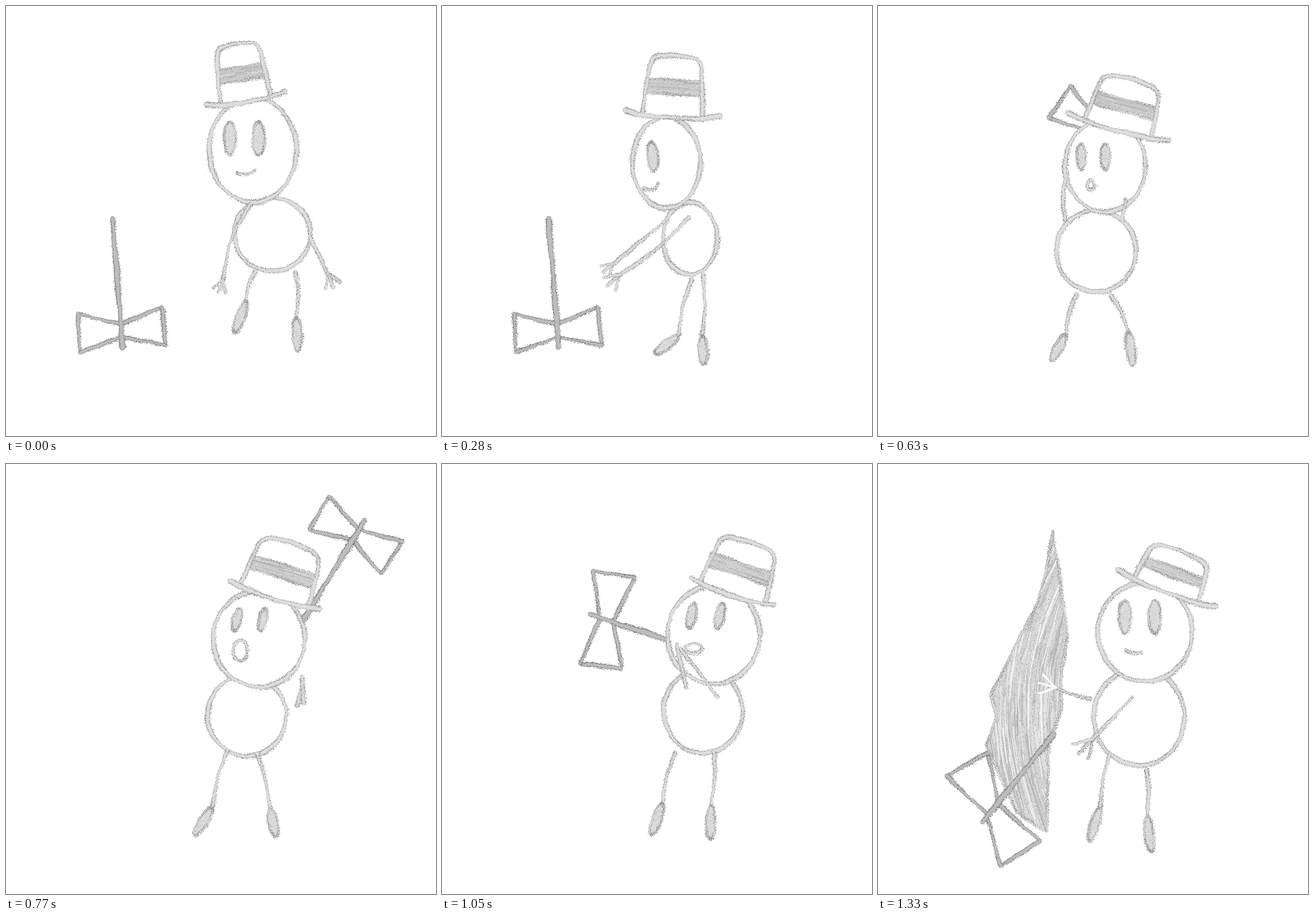
Animation of 748x748 px, one loop 1.47 s. Source, as an HTML page with a canvas:

```html
<!DOCTYPE html>
<html lang="en">
<head>
<meta charset="utf-8">
<title>Pencil woodcutter</title>
<style>
html, body { margin: 0; width: 100%; height: 100%; overflow: hidden; background: #fff; }
canvas { display: block; width: 100vw; height: 100vh; }
</style>
</head>
<body>
<canvas id="stage" width="748" height="748"></canvas>
<script>
const SIZE = 748, LOOP = 1470, BEAT = 140;

// core and light: body of a line; tone: darkest grain; grain: dots per pixel; patch: unevenness
const BODY = { core: '#cecece', light: '#dedede', tone: 134, grain: 2.5, patch: 0.6, inner: 210, width: 1 };
const IRON = { core: '#acacac', light: '#bdbdbd', tone: 106, grain: 2.4, patch: 0.5, inner: 176, width: 1 };
const DARK = { core: '#8c8c8c', light: '#888', tone: 122, grain: 1.8, patch: 0.7, inner: 132, width: 0.7 };
const FAINT = { tone: 122, grain: 1.3, patch: 1.5, inner: 150, width: 0.4 };
const SMUDGE = { tone: 108, grain: 2.6, patch: 0.9, inner: 130, width: 0.5 };
const CHALK = { core: '#f2f2f2', light: '#fff', tone: 205, grain: 0.6, patch: 0, inner: 245, width: 1 };

let ctx, ink = BODY, seed = 1;

const rnd = () => {
  seed = (seed * 1664525 + 1013904223) >>> 0;
  return seed / 4294967296;
};
const spread = () => rnd() + rnd() - 1;
const grey = v => { v = Math.round(v); return `rgb(${v},${v},${v})`; };

function dot(x, y, v) {
  ctx.fillStyle = grey(v);
  ctx.fillRect(Math.round(x), Math.round(y), 1, 1);
}

// Maps local points to the stage
const frame = (x, y, rot) => ([u, v]) =>
  [x + u * Math.cos(rot) - v * Math.sin(rot), y + u * Math.sin(rot) + v * Math.cos(rot)];

// Points about 1px apart, along straight segments or a Catmull-Rom curve
function sample(pts, curved) {
  const out = [], at = i => pts[Math.max(0, Math.min(pts.length - 1, i))];
  for (let i = 0; i < pts.length - 1; i++) {
    const [a, b, c, d] = [at(i - 1), at(i), at(i + 1), at(i + 2)];
    const n = Math.max(2, Math.ceil(Math.hypot(c[0] - b[0], c[1] - b[1])));
    for (let k = 0; k < n; k++) {
      const t = k / n;
      out.push([0, 1].map(j => curved
        ? b[j] + t * (c[j] - a[j] + t * (2 * a[j] - 5 * b[j] + 4 * c[j] - d[j] + t * (3 * (b[j] - c[j]) + d[j] - a[j]))) / 2
        : b[j] + t * (c[j] - b[j])));
    }
  }
  out.push(at(pts.length - 1));
  return out;
}

function fill(pts, color) {
  ctx.beginPath();
  pts.forEach(([x, y]) => ctx.lineTo(x, y));
  ctx.fillStyle = color;
  ctx.fill();
}

function pencil(w, line) {
  const p = rnd() * 9, q = rnd() * 9;
  const wob = i => Math.sin(i * 0.07 + p) * 0.7 + Math.sin(i * 0.19 + q) * 0.5;
  const half = i => w * ink.width * (0.43 + 0.09 * Math.sin(i * 0.045 + q));
  line = line.map(([x, y], i) => [x + wob(i) * 0.7, y + wob(i + 40) * 0.7]);
  for (const [color, k] of ink.core ? [[ink.core, 0.95], [ink.light, 0.6]] : []) {
    ctx.fillStyle = color;
    line.forEach(([x, y], i) => {
      ctx.beginPath();
      ctx.arc(x, y, half(i) * k, 0, 7);
      ctx.fill();
    });
  }
  line.forEach(([x, y], i) => {
    const [ax, ay] = line[Math.max(0, i - 1)], [bx, by] = line[Math.min(line.length - 1, i + 1)];
    const len = Math.hypot(bx - ax, by - ay) || 1, nx = (ay - by) / len, ny = (bx - ax) / len;
    const lump = Math.sin(i * 0.05 + p), rough = 1.5 + Math.max(0, lump);
    for (let g = ink.grain * (1 + ink.patch * lump); rnd() < g; g--) {
      const off = (rnd() < 0.5 ? -1 : 1) * half(i) + spread() * rough;
      dot(x + nx * off + spread(), y + ny * off + spread(), ink.tone + rnd() * 48);
    }
  });
}

const line = (w, ...pts) => pencil(w, sample(pts, false));
const curve = (w, ...pts) => pencil(w, sample(pts, true));

// Curve between two points whose middle is pushed sideways
function bow(w, [x1, y1], [x2, y2], bend) {
  const len = Math.hypot(x2 - x1, y2 - y1) || 1;
  curve(w, [x1, y1], [(x1 + x2) / 2 - (y2 - y1) / len * bend, (y1 + y2) / 2 + (x2 - x1) / len * bend], [x2, y2]);
}

function ellipse(cx, cy, rx, ry, rot = 0) {
  const n = Math.ceil(6 * Math.max(rx, ry));
  return Array.from({ length: n + 1 }, (_, i) => {
    const a = i / n * 2 * Math.PI;
    return [rx * Math.cos(a), ry * Math.sin(a)];
  }).map(frame(cx, cy, rot));
}

function oval(cx, cy, rx, ry, rot = 0) {
  if (ink.core) fill(ellipse(cx, cy, rx - 1, ry - 1, rot), ink.light);
  const put = frame(cx, cy, rot);
  for (let i = 0; i < rx * ry * (ink.core ? 0.9 : 0.25); i++)
    dot(...put([spread() * rx, spread() * ry]), ink.inner + spread() * 24);
  pencil(ink.core ? 3 : 7, ellipse(cx, cy, rx - 1, ry - 1, rot));
}

const foot = ([x1, y1], [x2, y2], w) =>
  oval((x1 + x2) / 2, (y1 + y2) / 2, w, Math.hypot(x2 - x1, y2 - y1) / 2, Math.atan2(y2 - y1, x2 - x1) - Math.PI / 2);

const fan = (x, y, dir, len) => [-0.55, 0, 0.55].forEach(a =>
  line(5, [x, y], [x + len * Math.cos(dir + a), y + len * Math.sin(dir + a)]));

// Polygon of pencil streaks; bias crowds them to the top, lean(y) slants them
function shade(pts, { base, lo, hi, count, length, lean, bias = 1, grain = 0.1 }) {
  const xs = pts.map(p => p[0]), ys = pts.map(p => p[1]);
  const x0 = Math.min(...xs), y0 = Math.min(...ys);
  const w = Math.max(...xs) - x0, h = Math.max(...ys) - y0;
  ctx.save();
  fill(pts, base || 'transparent');
  ctx.clip();
  for (let i = 0; i < count; i++) {
    const x = x0 + rnd() * w, y = y0 + rnd() ** bias * h, k = length * (0.3 + rnd() * 0.4), a = lean(y);
    ctx.beginPath();
    ctx.moveTo(x - k * Math.cos(a), y - k * Math.sin(a));
    ctx.quadraticCurveTo(x + spread() * 3, y, x + k * Math.cos(a), y + k * Math.sin(a));
    ctx.strokeStyle = grey(lo + rnd() * (hi - lo));
    ctx.lineWidth = 0.5 + rnd() * 1.7;
    ctx.stroke();
  }
  for (let i = 0; i < w * h * grain; i++)
    dot(x0 + rnd() * w, y0 + rnd() ** bias * h, lo + spread() * 20);
  ctx.restore();
}

function hat([x, y, tilt, brim, crown, height], hard) {
  const put = frame(x, y, tilt), at = (u, v) => put([u * crown, -v * height]);
  const top = [at(-1, 0), at(-0.92, 0.5), at(-0.78, 0.93), at(-0.3, 1.03), at(0.4, 1.02), at(0.83, 0.92), at(0.95, 0.5), at(1, 0)];
  if (ink.core) fill(top, '#fff');
  const band = [at(-0.95, 0.62), at(0.93, 0.62), at(0.95, 0.37), at(-0.95, 0.37)];
  shade(band, ink.core
    ? { base: '#d0d0d0', lo: 172, hi: 226, count: 60, length: 45, lean: () => tilt }
    : { lo: 125, hi: 165, count: 26, length: 28, lean: () => tilt, grain: 0.18 });
  pencil(3, sample([...band, band[0]], false));
  pencil(8, sample(top, true));
  ink = hard;
  curve(9, put([-brim, -6]), put([-brim / 2, 1]), put([brim / 2, 1]), put([brim, -6]));
}

// Handle from the grip down its own axis, two mirrored blades near the end
function axe([x, y, rot, len, size, twist], wood = IRON, blade = IRON) {
  const put = frame(x, y, rot), head = put([0, len - 30]);
  const at = frame(...head, rot + twist);
  ink = blade;
  for (const s of [-size, size]) {
    line(7, at([0, -11 * size]), at([s * 73, -35 * size]));
    line(7, at([s * 73, -35 * size]), at([s * 75, 32 * size]));
    line(7, at([s * 75, 32 * size]), at([0, 11 * size]));
  }
  ink = wood;
  line(10, [x, y], put([0, len]));
}

function man({ body, head, hat: cap, eyes, mouth, arms, legs, axe: tool }, soft = BODY, hard = soft) {
  ink = soft;
  pencil(8, ellipse(...body));
  legs.forEach(([hx, hy, ax, ay, tx, ty], i) => {
    bow(6.5, [hx, hy], [ax, ay], i ? -4 : 4);
    foot([ax, ay], [tx, ty], 9);
  });
  if (ink.core) fill(ellipse(...head), '#fff');
  pencil(8, ellipse(...head));
  const [ex, ey, gap, ry, tilt] = eyes;
  for (const s of gap ? [-1, 1] : [0]) oval(ex + s * gap, ey, ry * 0.38, ry, tilt);
  const [mx, my, half, bend, slant, open] = mouth, lip = frame(mx, my, slant);
  if (open > 5) pencil(5, ellipse(mx, my, half, open));
  else curve(5, lip([-half, -bend]), lip([0, bend]), lip([half, -bend]));
  hat(cap, hard);
  arms.forEach(([sx, sy, hx, hy, bend, finger], i) => {
    ink = i ? hard : soft;
    bow(6, [sx, sy], [hx, hy], bend);
    if (finger > 0) fan(hx, hy, Math.atan2(hy - sy, hx - sx), finger);
    if (finger < 0) pencil(5, ellipse(hx, hy, -finger / 3, -finger, tool[2]));
  });
}

// hat: x y tilt brim crown height; eyes: x y gap size tilt; mouth: x y half bend slant open
// arms: shoulder, hand, bend, fingers; legs: hip, ankle, toe; axe: grip, angle, length, size, twist
const stand = {
  hat: [417, 165, -0.17, 71, 44, 98], head: [429, 250, 76, 91], body: [463, 397, 66, 64],
  eyes: [414, 230, 25, 30, 0], mouth: [418, 290, 18, 2, -0.2, 0],
  arms: [[425, 343, 377, 476, 10, 24], [528, 400, 559, 466, 0, 27]],
  legs: [[433, 462, 418, 512, 397, 569], [503, 462, 505, 540, 507, 601]],
  axe: [185, 370, -0.08, 225, 1, 0]
};
const bend = {
  hat: [400, 192, 0.06, 83, 52, 103], head: [390, 272, 59, 79], body: [431, 404, 47, 63],
  eyes: [366, 261, 0, 27, -0.1], mouth: [364, 316, 15, 4, -0.35, 0],
  arms: [[390, 372, 298, 448, 0, 23], [430, 367, 310, 467, -6, 30]],
  legs: [[434, 475, 411, 573, 369, 605], [454, 466, 452, 572, 455, 624]],
  axe: stand.axe
};
const hold = {
  hat: [411, 200, 0.19, 93, 52, 112], head: [402, 272, 80, 79], body: [395, 404, 45, 53],
  eyes: [400, 250, 26, 25, 0.06], mouth: [397, 295, 30, 0, 0.08, 0],
  arms: [[350, 372, 283, 424, 0, -22], [348, 385, 270, 458, 0, -22]],
  legs: [[371, 462, 361, 558, 348, 608], [415, 460, 439, 540, 436, 603]],
  axe: [297, 407, 0.55, 202, 0.95, 0]
};
const lift = {
  hat: [417, 215, 0.26, 92, 60, 88], head: [395, 278, 70, 80], body: [379, 426, 69, 71],
  eyes: [374, 262, 21, 24, 0], mouth: [370, 311, 6, 0, 0, 9],
  arms: [[325, 375, 326, 300, -4, 0], [425, 375, 430, 335, 0, 0]],
  legs: [[345, 500, 327, 570, 300, 618], [404, 503, 435, 565, 443, 627]],
  axe: [365, 225, -2.52, 50, 1, 0]
};
const shout = {
  hat: [487, 223, 0.32, 78, 64, 101], head: [459, 298, 84, 85], body: [436, 425, 68, 70],
  eyes: [445, 257, 23, 21, 0.35], mouth: [423, 313, 15, 0, 0, 22],
  arms: [[505, 410, 515, 355, 3, 0], [517, 405, 515, 360, 0, 0]],
  legs: [[402, 480, 372, 590, 339, 641], [450, 488, 469, 596, 481, 641]],
  axe: [412, 205, 2.65, 115, 1, -0.44]
};
const strike = {
  hat: [505, 229, 0.32, 76, 56, 88], head: [471, 296, 78, 85], body: [456, 432, 69, 76],
  eyes: [457, 268, 26, 25, 0.1], mouth: [437, 325, 13, 2, 0.4, 0],
  arms: [[474, 406, 390, 392, 0, 0], [402, 368, 345, 402, 8, 0]],
  legs: [[398, 515, 381, 588, 370, 648], [477, 508, 457, 590, 447, 662]],
  axe: [402, 381, 1.38, 184, 1.15, 0]
};
const rest = {
  hat: [500, 221, 0.36, 92, 60, 72], head: [464, 292, 82, 86], body: [454, 440, 79, 84],
  eyes: [455, 266, 26, 30, 0], mouth: [444, 327, 15, 2, 0.1, 0],
  arms: [[370, 409, 310, 388, -3, 0], [443, 405, 373, 478, 0, 37]],
  legs: [[403, 505, 386, 597, 367, 657], [466, 530, 468, 611, 475, 676]],
  axe: [305, 470, 0.68, 198, 1.22, 0.35]
};

function mix(a, b, t) {
  if (typeof a === 'number') return a + (b - a) * t;
  if (Array.isArray(a)) return a.map((v, i) => mix(v, b[i], t));
  return Object.fromEntries(Object.keys(a).map(k => [k, mix(a[k], b[k], t)]));
}

function scene(pose, dx = 0, dy = 0) {
  axe(pose.axe);
  ctx.translate(dx, dy);
  man(pose);
}

function impact() {
  const flash = [[305, 126], [314, 210], [323, 318], [300, 390], [296, 512], [262, 420], [247, 318], [258, 270], [290, 215]];
  shade(flash, { lo: 132, hi: 160, count: 270, length: 75, lean: () => 1.78, bias: 1.5, grain: 0.08 });
  axe(strike.axe, DARK, SMUDGE);
  man(strike, FAINT, DARK);
  for (const [x, y] of [[254, 411], [270, 328], [452, 206], [476, 158], [572, 195], [512, 373]]) oval(x, y, 4, 5);
  ink = SMUDGE;
  bow(7, [207, 528], [290, 520], 12);
}

function felled() {
  const trunk = [[304, 116], [315, 190], [330, 303], [318, 360], [320, 420], [297, 490], [293, 640],
    [240, 605], [188, 490], [205, 440], [196, 400], [278, 240], [293, 180]];
  const lean = y => Math.PI / 2 + (430 - y) / 500;
  shade(trunk, { base: '#d8d8d8', lo: 172, hi: 238, count: 420, length: 90, lean, grain: 0.13 });
  shade(trunk, { lo: 232, hi: 250, count: 110, length: 80, lean, grain: 0 });
  ink = BODY;
  pencil(4, sample([...trunk, trunk[0]], false));
  scene(rest);
  ink = CHALK;
  fan(310, 389, -2.9, 32);
}

const cuts = [
  () => scene(stand),
  () => scene(mix(stand, bend, 0.08), 0, -6),
  () => scene(bend),
  () => scene(hold),
  () => scene({ ...mix(hold, lift, 0.72), axe: [300, 365, 1.15, 202, 0.95, 0] }),
  () => scene(lift),
  () => scene({ ...mix(lift, shout, 0.7), arms: shout.arms, axe: [506, 289, -2.59, 225, 1, 0] }, 0, 12),
  () => { foot([310, 141], [308, 194], 6); scene(shout); },
  () => scene({ ...mix(shout, strike, 0.6), arms: [[474, 406, 408, 320, 0, 0], [418, 390, 402, 312, 0, 0]] }, 6),
  impact,
  felled
];
// The held axe stays for half a beat only
const startOf = i => BEAT * i - (i > 3 ? BEAT / 2 : 0);

const sheets = cuts.map((draw, i) => {
  const sheet = document.createElement('canvas');
  sheet.width = sheet.height = SIZE;
  ctx = sheet.getContext('2d');
  ctx.fillStyle = '#fff';
  ctx.fillRect(0, 0, SIZE, SIZE);
  seed = 77 + i * 9001;
  ink = BODY;
  draw();
  return { start: startOf(i), sheet };
});

const view = document.getElementById('stage').getContext('2d');
const begin = performance.now();
let shown;

function show(now) {
  const t = Math.max(0, now - begin) % LOOP;
  const { sheet } = sheets.findLast(s => s.start <= t);
  if (sheet !== shown) view.drawImage(shown = sheet, 0, 0);
  requestAnimationFrame(show);
}
show(begin);
</script>
</body>
</html>
```
